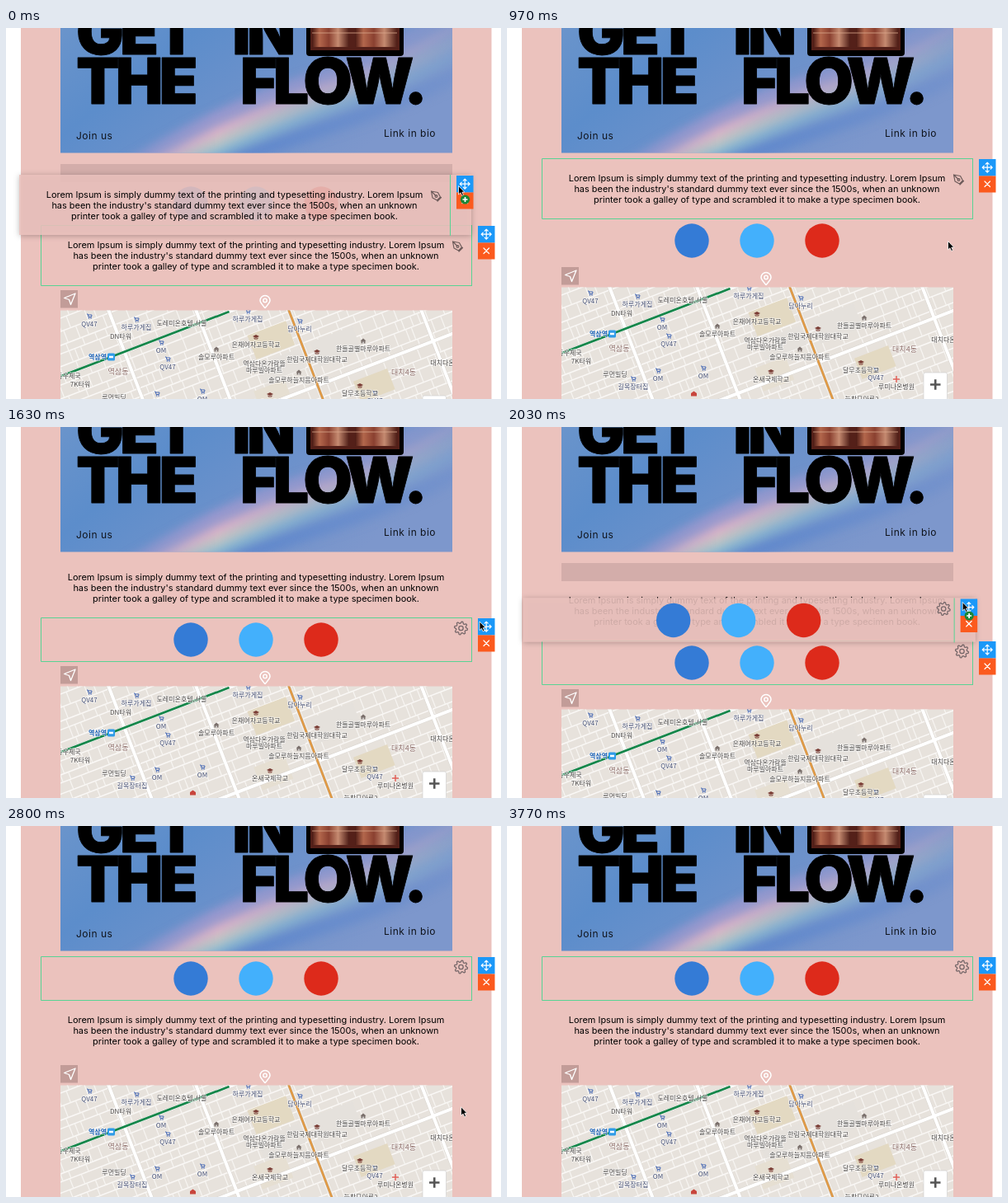
These frames come from a looping animation (600 by 450 pixels, 3810 ms). An HTML page:

```html
<!DOCTYPE html>
<html lang="ko">
<head>
<meta charset="utf-8">
<title>Block editor</title>
<style>
  html, body { margin: 0; width: 100%; height: 100%; overflow: hidden; background: #fff; }
  svg { display: block; width: 100vw; height: 100vh; }
  .body { font: 10.95px Inter, sans-serif; text-anchor: middle; }
  .caption { font: 12px Inter, sans-serif; letter-spacing: .5px; fill: #10141c; }
  .headline { font: 900 77px Inter, sans-serif; letter-spacing: -5px; stroke: #000; stroke-width: .8; stroke-linejoin: round; }
  .map text { font: 500 8px "Noto Sans CJK KR", "Noto Sans CJK", sans-serif; text-anchor: middle;
    fill: #494644; stroke: #fff; stroke-width: 1.4; stroke-opacity: .7; paint-order: stroke; }
  .map text.shop { fill: #424c70; }
  .map text.area { font-size: 9px; fill: #8a6a64; }
  .map text.station { font-weight: 700; fill: #1c62b5; }
  .line { fill: none; stroke-linecap: round; stroke-linejoin: round; }
  .border { fill: none; stroke: #58d394; }
</style>
</head>
<body>
<svg viewBox="0 0 600 450" preserveAspectRatio="none">
  <defs>
    <linearGradient id="sky" x1="0" y1="0" x2="1" y2=".4">
      <stop offset="0" stop-color="#6a94cb"/><stop offset=".3" stop-color="#5c8dcb"/>
      <stop offset=".65" stop-color="#6f92cb"/><stop offset="1" stop-color="#7d97cc"/>
    </linearGradient>
    <linearGradient id="lamp">
      <stop offset="0" stop-color="#4a1a14"/><stop offset=".2" stop-color="#b3674c"/>
      <stop offset=".45" stop-color="#8a4030"/><stop offset=".7" stop-color="#c58a70"/>
      <stop offset="1" stop-color="#4e1d16"/>
    </linearGradient>
    <linearGradient id="fade">
      <stop offset=".2" stop-color="#999"/><stop offset=".4" stop-color="#fff"/>
      <stop offset=".62" stop-color="#bbb"/><stop offset="1" stop-color="#444"/>
    </linearGradient>
    <mask id="rainbowFade" maskUnits="userSpaceOnUse" x="66" y="0" width="475" height="152">
      <rect x="66" width="475" height="152" fill="url(#fade)"/>
    </mask>
    <filter id="soft" x="-20%" y="-50%" width="140%" height="200%"><feGaussianBlur stdDeviation="6"/></filter>
    <filter id="shadow" x="-10%" y="-30%" width="120%" height="160%">
      <feDropShadow dx="0" dy="1" stdDeviation="3.5" flood-opacity=".3"/>
    </filter>
    <clipPath id="posterClip"><rect x="66" width="475" height="151.5"/></clipPath>
    <clipPath id="mapClip"><rect x="66" y="314.5" width="475" height="140"/></clipPath>

    <g id="pen" class="line" stroke="#6d5b5a" stroke-width="1.2">
      <path d="M-6-6 L2-4.5 5 1 1 5-4.5 2Z M-6-6 L-.5-.5 M6 1.5 L1.5 6"/><circle r="1.4"/>
    </g>
    <g id="gear" class="line" stroke="#77686a" stroke-width="1.3"><path id="gearRim"/><circle r="2.7"/></g>
    <g id="move" class="line" stroke="#fff" stroke-width="1.2">
      <path d="M-6 0H6M0-6V6M-4-2L-6 0-4 2M4-2L6 0 4 2M-2-4L0-6 2-4M-2 4L0 6 2 4"/>
    </g>
    <g id="handle">
      <rect width="20.5" height="20.5" fill="#1b98f8"/><use href="#move" x="10.2" y="10.2"/>
      <rect y="20.5" width="20.5" height="20" fill="#fb5a1e"/>
      <path class="line" d="M7 27L13.5 33.5M13.5 27L7 33.5" stroke="#fff" stroke-width="1.2"/>
    </g>
    <g id="textBlock" class="body">
      <text x="261" y="27.8">Lorem Ipsum is simply dummy text of the printing and typesetting industry. Lorem Ipsum</text>
      <text x="261" y="40.8">has been the industry's standard dummy text ever since the 1500s, when an unknown</text>
      <text x="261" y="53.8">printer took a galley of type and scrambled it to make a type specimen book.</text>
    </g>
    <g id="socialBlock">
      <circle cx="182" cy="27" r="20.7" fill="#347bd6"/>
      <circle cx="261" cy="27" r="20.7" fill="#43b0fc"/>
      <circle cx="340" cy="27" r="20.7" fill="#dd2a1b"/>
    </g>
    <g id="textTools">
      <path class="border" d="M522.5 0V74"/>
      <use href="#pen" x="505.5" y="26"/><use href="#handle" x="530" y="1"/>
    </g>
    <g id="socialTools">
      <path class="border" d="M522.5 0V54"/>
      <use href="#gear" x="509.5" y="13"/><use href="#handle" x="530" y="1"/>
    </g>
    <g id="textFrame"><path class="border" d="M522 .5H.5V73.5H522"/><use href="#textTools"/></g>
    <g id="socialFrame"><path class="border" d="M522 .5H.5V53.5H522"/><use href="#socialTools"/></g>
  </defs>

  <rect width="600" height="450" fill="#fff"/>
  <rect x="18" width="570.5" height="450" fill="#ebc2bd"/>

  <g clip-path="url(#posterClip)">
    <rect x="66" width="475" height="152" fill="url(#sky)"/>
    <g mask="url(#rainbowFade)"><g class="line" filter="url(#soft)" stroke-width="12">
      <path d="M150 165Q265 95 370 62T560-35" stroke="#b09bd0" stroke-opacity=".8"/>
      <path d="M172 168Q280 108 385 73T575-22" stroke="#dfb0c8"/>
      <path d="M190 170Q295 117 395 83T585-8" stroke="#d8d3c0" stroke-opacity=".8"/>
      <path d="M206 172Q310 125 405 93T595 6" stroke="#8fc4d2" stroke-opacity=".8"/>
      <path d="M228 178Q330 140 420 110T600 28" stroke="#5f87cc" stroke-width="18"/>
    </g></g>
    <g class="headline">
      <text x="85" y="32">GET</text><text x="346" y="32" text-anchor="end">IN</text>
      <text x="85" y="92">THE</text><text x="506" y="92" text-anchor="end">FLOW.</text>
    </g>
    <rect x="364" y="-8" width="118" height="42" rx="4"/>
    <rect x="369" y="-8" width="108" height="35" fill="#542019"/>
    <rect x="371" y="-8" width="45" height="31" fill="url(#lamp)"/>
    <rect x="423" y="-8" width="51" height="31" fill="url(#lamp)"/>
    <path d="M371 6H474" stroke="#d9a78c" stroke-opacity=".4" stroke-width="2"/>
    <text class="caption" x="85" y="134.5">Join us</text>
    <text class="caption" x="458" y="132">Link in bio</text>
  </g>

  <g id="lower">
    <rect x="66" y="290" width="21" height="21.5" fill="#c29c98"/>
    <path class="line" d="M70.5 299.5L84 294 78.5 307.5 76.5 301.5Z" stroke="#fff" stroke-width="1.3"/>
    <g class="line" stroke="#fff" stroke-width="1.5">
      <path d="M314 311.5C310 307 308 305 308 302.5A6 6 0 0 1 320 302.5C320 305 318 307 314 311.5Z"/>
      <circle cx="314" cy="302.5" r="2.2"/>
    </g>
    <g class="map" clip-path="url(#mapClip)">
      <rect x="66" y="314" width="475" height="140" fill="#e7e2dc"/>
      <g id="streets" transform="translate(343 315) rotate(-21)"></g>
      <g id="labels"></g>
      <rect x="123" y="366.5" width="9" height="9" rx="1.5" fill="#2f9be8"/>
      <path d="M125 371H130" stroke="#fff" stroke-width="2.5"/>
      <path d="M472 422V430M468 426H476" stroke="#e06058" stroke-width="1.5"/>
      <path d="M223 443L226.5 440.500 230 443V446.500H223Z" fill="#c8453c"/>
      <rect x="505" y="418" width="28.5" height="40" rx="2" fill="#fff" stroke="#ccc" stroke-width=".6"/>
      <path d="M513 432.5H525.5M519.25 426.2V438.8" stroke="#555" stroke-width="2.6"/>
    </g>
  </g>

  <rect id="slot" x="66" y="165" width="475" height="22" fill="#d3adaa"/>
  <use id="social" href="#socialBlock"/>
  <use id="text" href="#textBlock"/>
  <use id="frame"/>
  <g id="ghost">
    <rect id="ghostBack" width="548" fill="#ebc2bd" fill-opacity=".86" filter="url(#shadow)"/>
    <use id="ghostBlock"/><use id="ghostTools"/>
  </g>
  <g id="cursor">
    <path d="M0 0V10.5L2.4 8.3 4.2 12 6 11.1 4.3 7.6H7.3Z" stroke="#fff" stroke-width=".8"/>
    <g id="badge"><circle cx="8" cy="16.5" r="5.6" fill="#1b8636"/>
      <path d="M5 16.5H11M8 13.5V19.5" stroke="#fff" stroke-width="1.7"/></g>
  </g>
</svg>
<script>
const $ = id => document.getElementById(id);
const LOOP = 3810, LEFT = 42, TOP = 158, TEXT_H = 73, SOCIAL_H = 53, SLOT_H = 28;
const TEXT_DROP = 170, SELECT_SOCIAL = 1130, GRAB = 1680, SLOT_OPEN = 1980, SOCIAL_DROP = 2300;

function buildGear() {
  const points = [];
  for (let i = 0; i < 32; i++) {
    const angle = (i + .5) * Math.PI / 16, radius = i % 4 < 2 ? 8 : 6;
    points.push((radius * Math.cos(angle)).toFixed(2) + ' ' + (radius * Math.sin(angle)).toFixed(2));
  }
  $('gearRim').setAttribute('d', 'M' + points.join('L') + 'Z');
}

// The street grid lives in a rotated frame: u runs along the green line, v along the orange one.
function buildStreets() {
  let seed = 27;
  const random = () => (seed = seed * 16807 % 2147483647) / 2147483647;
  const road = (d, color, width) => `<path d="${d}" stroke="${color}" stroke-width="${width}" fill="none"/>`;
  const land = (u, v, w, h, color) => `<rect x="${u}" y="${v}" width="${w}" height="${h}" fill="${color}"/>`;
  let lanes = '', alleys = '';
  for (let v = -140; v < 250;) {
    const height = 8 + random() * 9;
    lanes += `M-330 ${v.toFixed(1)}H260`;
    for (let u = -330; u < 260; u += 7 + random() * 20) alleys += `M${u.toFixed(1)} ${v.toFixed(1)}v${height.toFixed(1)}`;
    v += height;
  }
  const avenues = 'M-330-25H260M150-150V250M-204-150V250M-330 97H260M-105-150V250';
  $('streets').innerHTML =
    road(lanes, '#faf8f6', 1.5) + road(alleys, '#f7f5f2', 1.2) +
    land(-58, 10, 50, 31, '#e3d9c2') + land(-75, 76, 40, 30, '#e6dfd2') + land(42, 108, 44, 27, '#e3d9c2') +
    land(-60, 47, 54, 25, '#e5e1dc') + land(10, 45, 55, 32, '#e5e1dc') +
    road(avenues, '#d9d4ce', 5) + road(avenues, '#fff', 4) +
    road('M0-150V250', '#f6f3ef', 5.5) + road('M0-150V250', '#c0a98c', 3.2) + road('M0-150V250', '#e39a42', 2.2) +
    road('M-330-25H-68', '#16864a', 2.8);
}

function buildLabels() {
  const cart = '<path d="M-3-2.5H-1.8L-1 1H2.5L3-1.5H-1.5" fill="none" stroke="#4668b4"/><circle cx="-.5" cy="2.5" r=".8" fill="#4668b4"/><circle cx="2" cy="2.5" r=".8" fill="#4668b4"/>';
  const home = '<path d="M-3.5 0L0-3 3.5 0H2.5V3H-2.5V0Z" fill="#7b706c"/><path d="M-.6 1H.6V3H-.6Z" fill="#fff"/>';
  const school = '<path d="M-4-.5L0-2.5 4-.5 0 1.5Z" fill="#7a3c34"/><path d="M-2 1V2.5H2V1" fill="none" stroke="#7a3c34"/>';
  const icons = { cart, home, school };
  const places = [
    ['QV47', 101, 331, 'cart'], ['하루가게집', 158, 335, 'cart'], ['도레미온호텔,서울', 213, 330],
    ['하루가게집', 293, 325, 'cart'], ['DN타워', 139, 346], ['담아누리', 356, 337, 'cart'],
    ['은채여자고등학교', 303, 356, 'school'], ['OM', 188, 363, 'cart'], ['솔모루아파트', 255, 371, 'home'],
    ['역삼다온가람뜰', 313, 378.5], ['마루빌아파트', 313, 387], ['한림국제대학원대학교', 377, 374, 'school'],
    ['한들골별마루아파트', 433, 361, 'home'], ['대치다온', 529, 378], ['QV47', 196, 383, 'cart'],
    ['동우체국', 76, 394], ['7K타워', 90, 404], ['솔모루하늘지음아파트', 355, 399, 'home'],
    ['루먼빌딩', 131, 420], ['OM', 183, 425, 'cart'], ['OM', 238, 422, 'cart'], ['QV47', 447, 424, 'cart'],
    ['길목장터집', 153, 435, 'cart'], ['온새국제학교', 320, 426, 'school'], ['달무초등학교', 429, 415, 'school'],
    ['루미나온병원', 472, 435], ['늘찬모아루2', 430, 450],
    ['역삼역', 111, 371, 'station'], ['역삼동', 136, 389, 'area'], ['대치4동', 482, 390, 'area']
  ];
  $('labels').innerHTML = places.map(([name, x, y, kind]) => {
    const icon = icons[kind] ? `<g transform="translate(${x} ${y - 9.5})">${icons[kind]}</g>` : '';
    return `${icon}<text x="${x}" y="${y + 3}" class="${kind === 'cart' ? 'shop' : kind || ''}">${name}</text>`;
  }).join('');
}

// Each stop: time, x, y.
const cursorPath = [
  [0, 548.5, 191.5], [430, 548.5, 192.5], [930, 534.5, 258.5], [1170, 534.5, 258.5],
  [1560, 574, 236], [GRAB, 574, 236], [2150, 548, 208], [SOCIAL_DROP, 548, 208],
  [2410, 547, 219.5], [2620, 547, 219.5], [2980, 556, 460], [LOOP, 556, 460]
];

function cursorAt(t) {
  const i = cursorPath.findIndex(stop => stop[0] > t);
  const [t0, x0, y0] = cursorPath[i - 1], [t1, x1, y1] = cursorPath[i];
  const p = (t - t0) / (t1 - t0), ease = p * p * (3 - 2 * p);
  return [x0 + (x1 - x0) * ease, y0 + (y1 - y0) * ease];
}

const place = (id, x, y) => $(id).setAttribute('transform', `translate(${x} ${y})`);
const show = (id, visible) => $(id).style.display = visible ? '' : 'none';

function render(t) {
  const textFirst = t >= TEXT_DROP && t < SOCIAL_DROP;
  const selected = t < SELECT_SOCIAL ? 'text' : 'social';
  const dragging = t < TEXT_DROP || (t >= GRAB && t < SOCIAL_DROP);
  const slotOpen = dragging && (t < TEXT_DROP || t >= SLOT_OPEN);
  const shift = slotOpen ? SLOT_H : 0;
  const y = {
    text: TOP + shift + (textFirst ? 0 : SOCIAL_H),
    social: TOP + shift + (textFirst ? TEXT_H : 0)
  };
  const [x, cursorY] = cursorAt(t);

  show('slot', slotOpen);
  place('lower', 0, shift);
  place('text', LEFT, y.text);
  place('social', LEFT, y.social);
  place('frame', LEFT, y[selected]);
  $('frame').setAttribute('href', `#${selected}Frame`);

  show('ghost', dragging);
  show('badge', dragging);
  if (dragging) {
    const grip = selected === 'text' ? 13.5 : 5;
    place('ghost', x - 532.5, cursorY - grip);
    $('ghostBack').setAttribute('height', selected === 'text' ? TEXT_H : SOCIAL_H);
    $('ghostBlock').setAttribute('href', `#${selected}Block`);
    $('ghostTools').setAttribute('href', `#${selected}Tools`);
  }
  place('cursor', x, cursorY);
}

buildGear();
buildStreets();
buildLabels();
const start = performance.now();
function tick() {
  render((performance.now() - start) % LOOP);
  requestAnimationFrame(tick);
}
tick();
</script>
</body>
</html>
```
